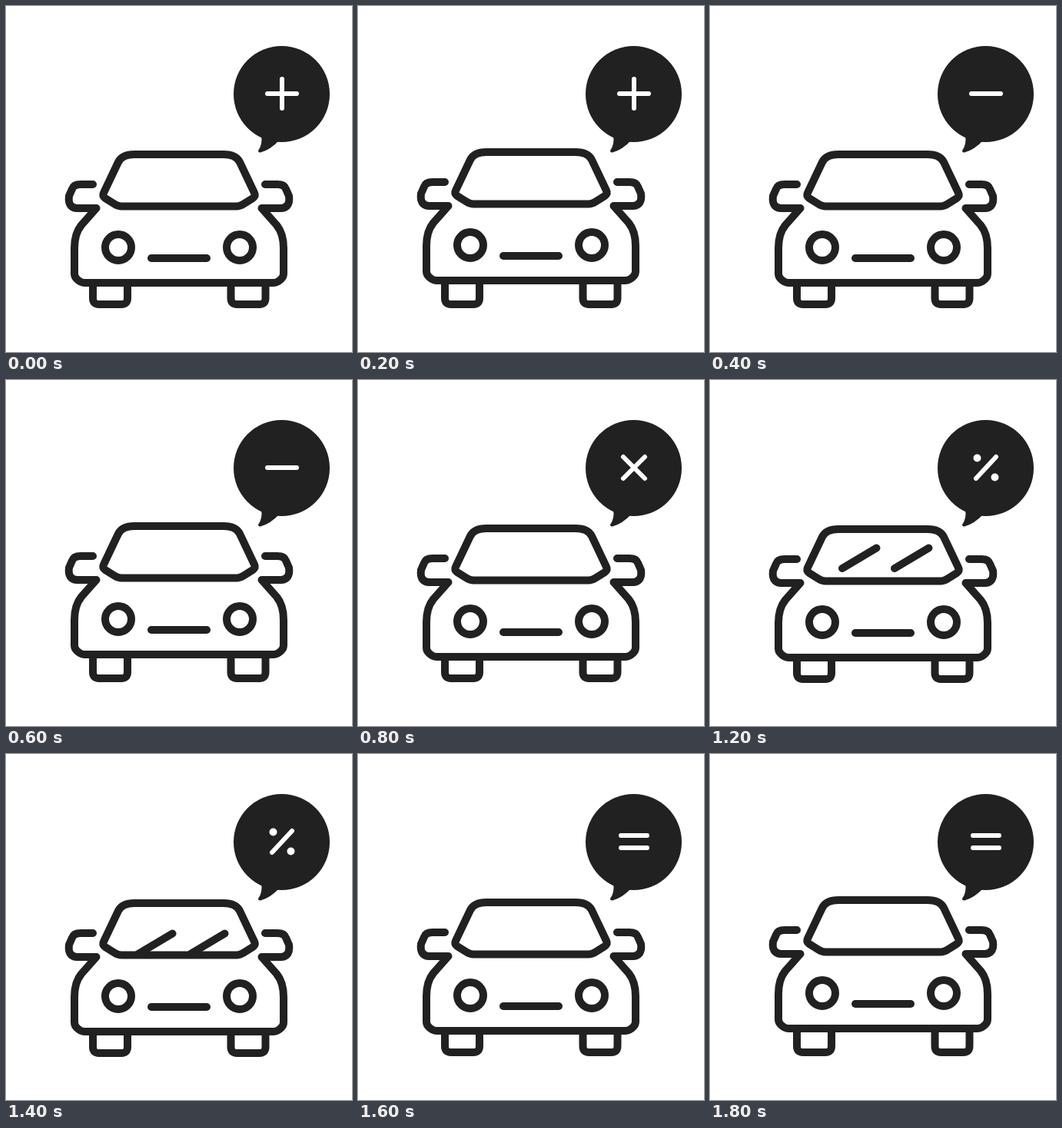
Recreate the animation shown at these times as an HTML page. Size 450 px wide and 450 px high, loop 2000 ms.

```html
<!DOCTYPE html>
<html lang="en">
<head>
<meta charset="utf-8">
<title>Car with speech bubble</title>
<style>
  html, body { margin: 0; width: 100%; height: 100%; overflow: hidden; background: #fff; }
  svg { display: block; width: 100vw; height: 100vh; }
  .ink { fill: none; stroke: #212121; stroke-width: 10; stroke-linecap: round; stroke-linejoin: round; }
  .bubble { fill: #212121; }
  .sign { fill: none; stroke: #fff; stroke-width: 6; stroke-linecap: round; }
  .dots { stroke-width: 10; }
</style>
</head>
<body>
<svg viewBox="0 0 450 450">
  <g class="ink">
    <path id="wheels" d="M113 362V380Q113 388 121 388H150Q158 388 158 380V362M292.500 362V380Q292.500 388 300.500 388H329.500Q337.500 388 337.500 380V362"/>
    <g id="body">
      <path d="M150 260.500Q146 260.500 141 257.500L129 250Q125 247 127 243L146 203Q151 193 167 193H283Q299 193 304 203L323 243Q325 247 321 250L309 257.500Q304 260.500 300 260.500Z"/>
      <path d="M113 232H97Q88 232 86 238L82 247Q80 262 92 263H117.500L98 285Q89 296 89 315V348Q89 352 92 355Q97 360 102 360H348Q353 360 358 355Q361 352 361 348V315Q361 296 352 285L332.500 263H358Q370 262 368 247L364 238Q362 232 353 232H337"/>
      <circle cx="146" cy="314" r="17"/>
      <circle cx="304" cy="314" r="17"/>
      <path d="M189 328H261"/>
      <path id="glare" d="M172 259L216.500 232.500M240 259L284.500 232.500"/>
    </g>
  </g>
  <g class="bubble">
    <circle cx="358.500" cy="114.500" r="62.500"/>
    <path d="M332 168Q334 180 328 188Q328 191 331 190.500Q344 187 356 174Z"/>
  </g>
  <path id="sign" class="sign"/>
  <path id="dots" class="sign dots" d="M347.500 101.500h0M370.500 126.500h0"/>
</svg>
<script>
  const STEP = 200;
  const signs = [
    'M340 114H378M359 95V133',
    'M340 114H378',
    'M345 100L373 128M373 100L345 128',
    'M346 128L372 100',
    'M342 106H376M342 122H376'
  ];
  const bounce = [0, -3, 0, -3, 0, 1, 1, 1, 0, -3];
  const get = id => document.getElementById(id);
  const [wheels, body, glare, sign, dots] = ['wheels', 'body', 'glare', 'sign', 'dots'].map(get);
  const shiftY = (el, y) => el.setAttribute('transform', `translate(0 ${y})`);
  const show = (el, on) => el.setAttribute('visibility', on ? 'visible' : 'hidden');

  function draw(now) {
    const step = Math.floor(now / STEP) % bounce.length;
    const signIndex = step >> 1;
    const braking = step >= 5 && step <= 7;
    sign.setAttribute('d', signs[signIndex]);
    show(dots, signIndex === 3);
    shiftY(body, bounce[step]);
    shiftY(wheels, braking ? 1 : 0);
    show(glare, braking);
    shiftY(glare, step === 6 ? -15 : 0);
    requestAnimationFrame(() => draw(performance.now()));
  }
  draw(performance.now());
</script>
</body>
</html>
```
